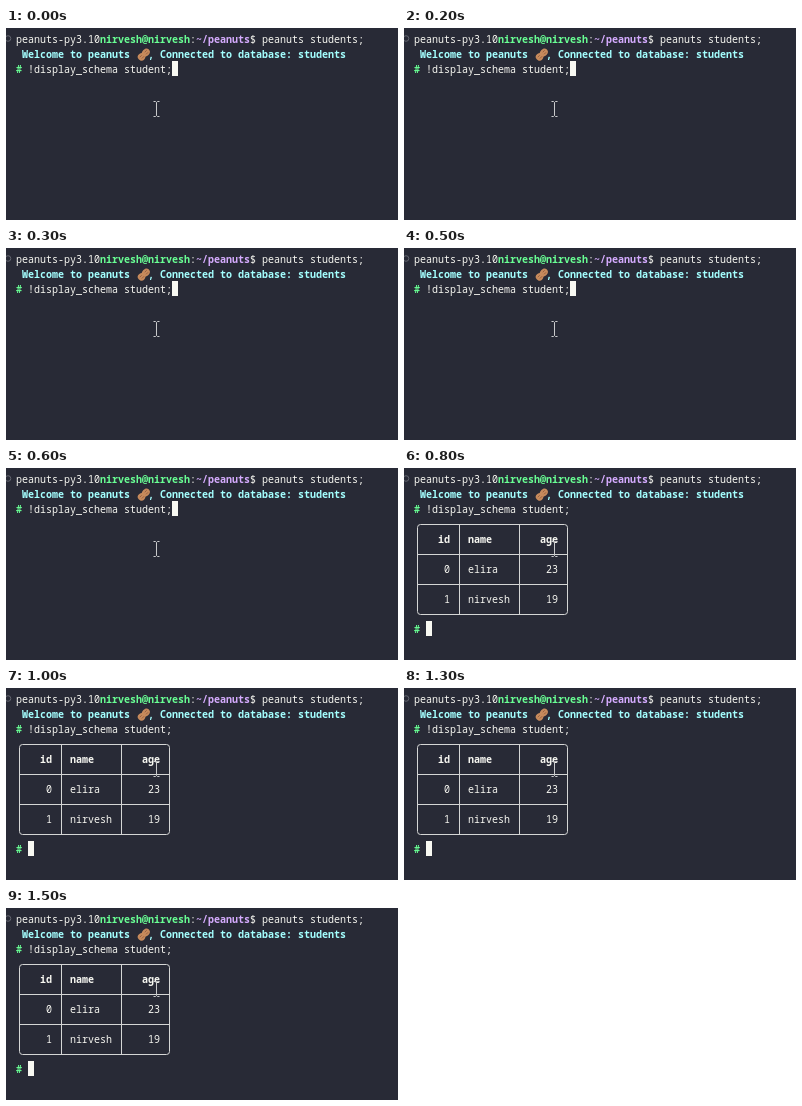
An HTML page for the animation above (1600 ms loop, 392 by 192 pixels).

```html
<!DOCTYPE html>
<html lang="en">
<head>
<meta charset="utf-8">
<title>Terminal session</title>
<style>
  html, body { margin: 0; width: 100%; height: 100%; overflow: hidden; background: #282a36; }
  svg { display: block; width: 392px; height: 192px; }
  text { font: 10px "Noto Sans Mono", "DejaVu Sans Mono", monospace; white-space: pre; }
  .bold { font-weight: 700; }
</style>
</head>
<body>
<svg viewBox="0 0 392 192">
  <rect width="392" height="192" fill="#282a36"/>
  <circle cx="2" cy="10.5" r="2.8" fill="none" stroke="#62656f"/>
  <g id="header"></g>
  <g transform="translate(138 26.5) rotate(-45) scale(1.1)">
    <path d="M-6.5 0C-6.5-4-2.5-4-.5-2.4C1.5-3.7 6.3-3.8 6.3 0S1.5 3.7-.5 2.4C-2.5 4-6.5 4-6.5 0Z" fill="#c68a5c"/>
    <path d="M-4.5-1H-2M-4 1.2H-1M2-1H4.5M1.5 1.2H4" stroke="#8f573a" stroke-width=".7"/>
  </g>
  <g id="typing"></g>
  <g id="result"></g>
  <path d="M147.5 73.5H149.5L150.5 74.5L151.5 73.5H153.5M150.5 74.5V87.5M147.5 88.5H149.5L150.5 87.5L151.5 88.5H153.5" fill="none" stroke="#c9cacc"/>
</svg>
<script>
(() => {
  const LOOP = 1600, RUN = 700;
  const LEFT = 10, CELL = 6, LINE = 15;
  const WHITE = '#f8f8f2', GREEN = '#69ff94', CYAN = '#a4ffff', LILAC = '#d6acff';

  const [header, typing, result] =
    ['header', 'typing', 'result'].map(id => document.getElementById(id));
  const xAt = col => LEFT + col * CELL;
  const midY = row => 11.5 + row * LINE;

  function add(parent, tag, attrs, content = '') {
    const el = document.createElementNS('http://www.w3.org/2000/svg', tag);
    for (const key in attrs) el.setAttribute(key, attrs[key]);
    el.textContent = content;
    parent.append(el);
  }

  function write(parent, row, col, content, fill = WHITE, bold = false) {
    add(parent, 'text', { x: xAt(col), y: 15 + row * LINE, fill, class: bold ? 'bold' : '' }, content);
  }

  function cursor(parent, row, col) {
    add(parent, 'rect', { x: xAt(col), y: 3 + row * LINE, width: CELL, height: LINE, fill: WHITE });
  }

  write(header, 0, 0, 'peanuts-py3.10');
  write(header, 0, 14, 'nirvesh@nirvesh', GREEN, true);
  write(header, 0, 29, ':');
  write(header, 0, 30, '~/peanuts', LILAC, true);
  write(header, 0, 39, '$ peanuts students;');
  write(header, 1, 1, 'Welcome to peanuts', CYAN, true);
  write(header, 1, 22, ', Connected to database: students', CYAN, true);
  write(header, 2, 0, '#', GREEN, true);
  write(header, 2, 2, '!display_schema student;');
  cursor(typing, 2, 26);

  // Result table: right-aligned id and age, left-aligned name
  const rows = [['id', 'name', 'age'], ['0', 'elira', '23'], ['1', 'nirvesh', '19']];
  rows.forEach(([id, name, age], i) => {
    const row = 4 + i * 2, bold = i === 0;
    write(result, row, 6 - id.length, id, WHITE, bold);
    write(result, row, 9, name, WHITE, bold);
    write(result, row, 24 - age.length, age, WHITE, bold);
  });
  const x0 = 13.5, x1 = 163.5, y0 = midY(3), y1 = midY(9);
  const border = { fill: 'none', stroke: '#d5d6d5' };
  add(result, 'rect', { x: x0, y: y0, width: x1 - x0, height: y1 - y0, rx: 3, ...border });
  const rules = [
    ...[55.5, 115.5].map(x => `M${x} ${y0}V${y1}`),
    ...[5, 7].map(row => `M${x0} ${midY(row)}H${x1}`)
  ];
  add(result, 'path', { d: rules.join(''), ...border });
  write(result, 10, 0, '#', GREEN, true);
  cursor(result, 10, 2);

  function swap(el, before, after) {
    el.animate([
      { opacity: before, offset: 0, easing: 'step-end' },
      { opacity: after, offset: RUN / LOOP, easing: 'step-end' },
      { opacity: after, offset: 1 }
    ], { duration: LOOP, iterations: Infinity });
  }
  swap(typing, 1, 0);
  swap(result, 0, 1);
})();
</script>
</body>
</html>
```
